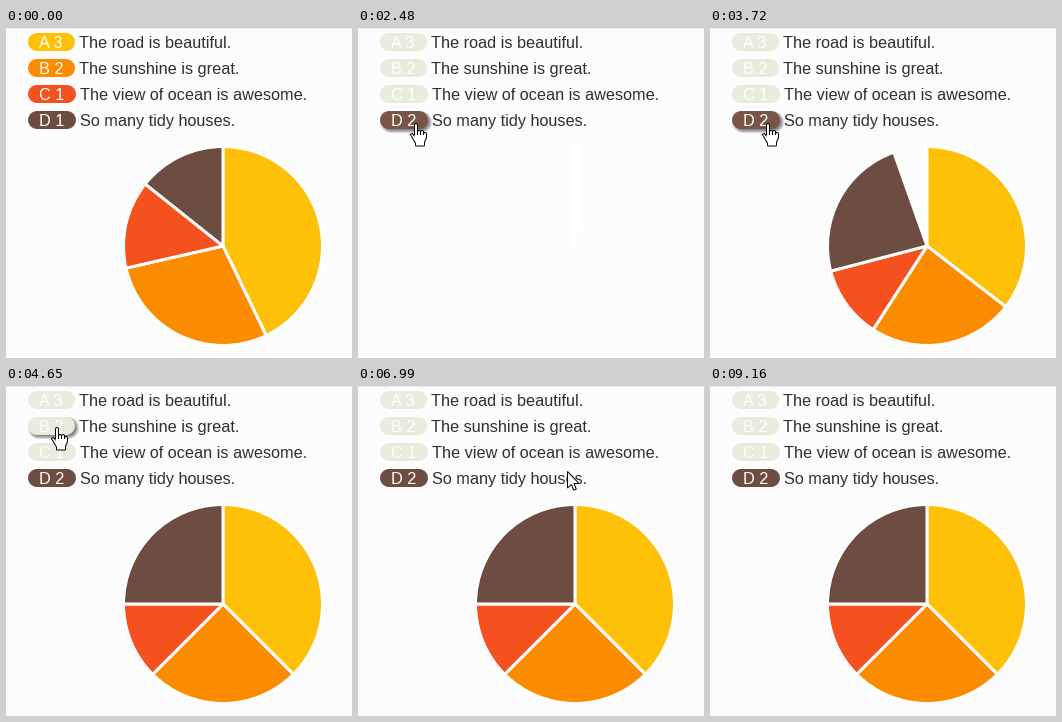
A matplotlib script for the animation above (9720 ms loop, 346 by 330 pixels).

```python
import math

import matplotlib.pyplot as plt
import numpy as np
from matplotlib.animation import FuncAnimation
from matplotlib.patches import Polygon, Rectangle, Wedge

W, H, DPI = 346, 330, 64
LOOP, TICK = 9720, 20
PX = 72 / DPI
BACK, MUTED, INK = "#fcfcfc", "#e9ebdd", "#303030"

# Key, votes, colour, hover colour, label
ROWS = [
    ("A", 3, "#ffc107", "#ffca28", "The road is beautiful."),
    ("B", 2, "#fb8c00", "#ff9f1c", "The sunshine is great."),
    ("C", 1, "#f4511e", "#ff6e40", "The view of ocean is awesome."),
    ("D", 1, "#6d4c41", "#795548", "So many tidy houses."),
]
LEFT, TOP, PITCH, PILL_H = 22, 5, 26, 18
CENTER, RADIUS, GAP = (217, 218), 99.5, 3

# Pointer moves: start, end, target x, target y, sideways bow
ENTRY = (297, 133)
MOVES = [
    (1470, 2020, 57, 95, 0),
    (4110, 4650, 50, 41, 32),
    (4950, 5500, 56, 63, 8),
    (5760, 6210, 59, 18, 24),
    (6610, 6990, 209, 85, 0),
    (6990, 7460, 213, 167, 0),
    (7620, 8150, 262, 196, 0),
]
SHOWN, HIDDEN = 1470, 9160
CLICKS, PRESS = (2330, 4800, 5660, 6380), 150
VOTE = CLICKS[0] + PRESS
GROW_START, GROW_TIME = 2430, 1650
STEP = 77.6

ARROW = np.array([(0, 0), (0, 16.5), (3.8, 13), (6.2, 18.6), (8.8, 17.5),
                  (6.5, 12), (11.5, 12)]) + 0.5
PALM = np.array([(-4, 11.5), (-2.8, 11), (-.5, 14), (-.5, 12), (10.5, 12),
                 (10.5, 16), (9, 19), (9, 22.5), (1, 22.5), (1, 20)])
FINGERS = np.array([p for k, top in enumerate((2, 8.5, 9, 10.5))
                    for p in ((.5 + 3 * k, top), (.5 + 3 * k, 14), (np.nan, np.nan))])

fig = plt.figure(figsize=(W / DPI, H / DPI), dpi=DPI, facecolor=BACK)
ax = fig.add_axes([0, 0, 1, 1])
ax.set_xlim(0, W)
ax.set_ylim(H, 0)
ax.axis("off")


def write(x, y, s, color):
    return ax.text(x, y, s, color=color, family="Liberation Sans",
                   size=16.22 * PX, va="baseline", zorder=4)


def pill_width(row):
    return 47 + row // 2


def stroke(x, y, color, width, z, **kw):
    return ax.plot(x, y, color=color, lw=width * PX, zorder=z,
                   solid_capstyle="round", **kw)[0]


def capsule(row, color, shift=0, grow=0, alpha=1, z=2):
    r = PILL_H / 2
    y = TOP + PITCH * row + r + shift
    x = [LEFT + r + shift, LEFT + pill_width(row) - r + shift]
    return stroke(x, [y, y], color, PILL_H + 2 * grow, z, alpha=alpha)


ax.add_patch(Rectangle((0, 0), W, 1, color="#ececec", lw=0))

pills, tags, shadows, slices = [], [], [], []
for i, (key, count, color, _, label) in enumerate(ROWS):
    base = TOP + PITCH * i + 15
    shadows.append([capsule(i, "black", 2, g, .14, 1) for g in range(-2, 3)])
    pills.append(capsule(i, color))
    tags.append(write(LEFT + 11.4, base, f"{key} {count}", "white"))
    write(LEFT + pill_width(i) + 4, base, label, INK)
    slices.append(ax.add_patch(Wedge(CENTER, RADIUS, 0, 1, fc=color, ec="white",
                                     lw=GAP * PX, joinstyle="bevel")))

arrow = ax.add_patch(Polygon(ARROW, fc="white", ec="black", lw=PX, zorder=8))
# Black layer first, then a thinner white one, leaves the outline and knuckles
palms = [ax.add_patch(Polygon(PALM, fc=c, ec=c, lw=w * PX, zorder=z, joinstyle="round"))
         for c, w, z in (("black", 2, 8), ("white", 0, 9))]
fingers = [stroke([], [], c, w, z) for c, w, z in (("black", 4, 8), ("white", 2, 9))]
turn = np.linspace(0, 2 * math.pi, 61)
rings = [(r, stroke([], [], c, 1.2, 7)) for r, c in ((11, "white"), (10, "black"))]


def bounce(t):
    """Ease-out bounce: each hop is half as long as the one before."""
    if t >= 1:
        return 1
    p, a, b = 1 - t, 0, 1
    while p < (7 - 4 * a) / 11:
        a, b = a + b, b / 2
    return 1 - b * b + ((11 - 6 * a - 11 * p) / 4) ** 2


def stepped(t):
    """Motion advances in coarse, even steps."""
    k = math.floor((t - SHOWN + 5) / STEP)
    return SHOWN + 5 + k * STEP


def pointer(t):
    x, y = ENTRY
    for start, end, to_x, to_y, bow in MOVES:
        u = min(max((t - start) / (end - start), 0), 1)
        e = 1 - (1 - u) ** 2
        x += (to_x - x) * e + bow * 4 * e * (1 - e)
        y += (to_y - y) * e
    return np.round([x, y])


def row_under(pos):
    for i in range(len(ROWS)):
        y = TOP + PITCH * i
        if LEFT <= pos[0] <= LEFT + pill_width(i) and y <= pos[1] <= y + PILL_H:
            return i
    return None


def draw_pie(votes, sweep, lit):
    angle = -90
    for i, wedge in enumerate(slices):
        end = angle + 360 * sweep * votes[i] / sum(votes)
        wedge.set_theta1(angle)
        wedge.set_theta2(end)
        wedge.set_facecolor(ROWS[i][3 if i == lit else 2])
        angle = end


def draw_pointer(pos, linked, visible, pressed):
    arrow.set_visible(visible and not linked)
    arrow.set_xy(ARROW + pos)
    for palm, finger in zip(palms, fingers):
        palm.set_visible(visible and linked)
        palm.set_xy(PALM + pos)
        finger.set_visible(visible and linked)
        finger.set_data(*(FINGERS + pos).T)
    for r, ring in rings:
        ring.set_visible(pressed)
        ring.set_data(pos[0] + .5 + r * np.cos(turn), pos[1] + .5 + r * np.sin(turn))


def update(n):
    t = n * TICK + TICK / 2
    s = stepped(t)
    voted = t >= VOTE
    visible = SHOWN <= t < HIDDEN
    pos = pointer(s)
    over = row_under(pos) if visible and t < MOVES[3][1] else None

    for i, (_, _, color, lit_color, _) in enumerate(ROWS):
        if voted and i != 3:
            pills[i].set_color(MUTED)
        else:
            pills[i].set_color(lit_color if i == over else color)
        for layer in shadows[i]:
            layer.set_visible(i == over)
    tags[3].set_text("D 2" if voted else "D 1")

    votes = [row[1] for row in ROWS]
    votes[3] += voted
    sweep = bounce((s - GROW_START) / GROW_TIME) if voted else 1
    lit = None
    if 7690 <= t < 9090:
        lit = 3 if pos[0] < CENTER[0] else 0
    draw_pie(votes, sweep, lit)
    draw_pointer(pos, over is not None, visible,
                 any(c <= t < c + PRESS for c in CLICKS))
    return []


anim = FuncAnimation(fig, update, frames=LOOP // TICK, interval=TICK,
                     init_func=lambda: update(0), repeat=True, repeat_delay=0)
plt.show()
```
